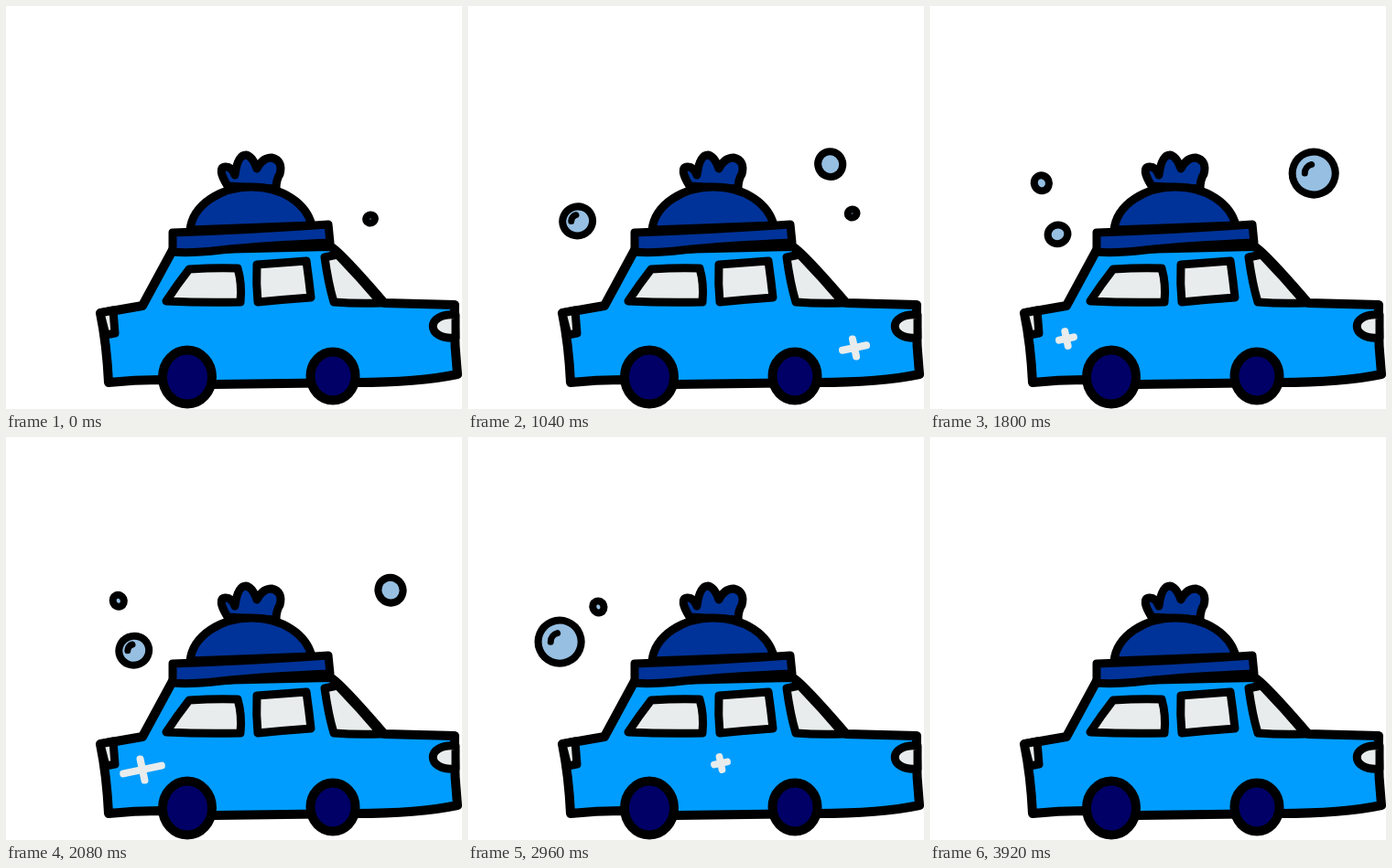
Write an HTML page with a canvas that moves like this. It is 498x441 px and loops after 4 s.

```html
<!DOCTYPE html>
<html lang="en">
<head>
<meta charset="utf-8">
<title>Clean car</title>
<style>
html, body { margin: 0; width: 100%; height: 100%; overflow: hidden; background: #fff; }
canvas { display: block; width: 498px; height: 441px; }
</style>
</head>
<body>
<canvas id="stage" width="498" height="441"></canvas>
<script>
const ctx = document.getElementById('stage').getContext('2d');
const LOOP = 4000, STEP = 40;
const BODY = '#009dff', HAT = '#003399', WHEEL = '#000066', GLASS = '#e8ecec', BUBBLE = '#96bfe2';

ctx.lineJoin = ctx.lineCap = 'round';

function paint(path, fill, width) {
  ctx.fillStyle = fill;
  ctx.fill(path);
  ctx.strokeStyle = '#000';
  ctx.lineWidth = width;
  ctx.stroke(path);
}

function shape(d, fill, width = 9) {
  paint(new Path2D(d), fill, width);
}

function oval(x, y, rx, ry, fill, width, tilt = 0) {
  const path = new Path2D();
  path.ellipse(x, y, rx, ry, tilt, 0, Math.PI * 2);
  paint(path, fill, width);
}

function drawCar() {
  shape('M103 336L149 328Q164 300 182 267L354 263Q364 268 413 325L490 327' +
    'Q489 365 493 403Q450 412 382 412L229 414L168 409Q140 409 112 412Q110 370 103 336Z', BODY, 10);
  shape('M200 288Q230 286 253 287Q258 304 256 324Q215 325 175 323Q186 306 200 288Z', GLASS);
  shape('M274 283Q300 281 328 279Q331 300 333 319Q305 321 275 324Q273 304 274 283Z', GLASS);
  shape('M348 275L362 272Q386 297 410 325Q382 326 358 324Q352 304 348 275Z', GLASS);
  shape('M491 338C458 335 458 366 491 363Z', GLASS);
  shape('M103 336L117 333L119 358L109 360Z', GLASS);
  oval(198, 406, 27, 29.5, WHEEL, 10);
  oval(357, 405, 24.5, 26.5, WHEEL, 10);

  shape('M242 197Q230 177 239 176Q246 175 250 185Q253 163 262 163Q269 164 274 178' +
    'Q280 166 290 166Q303 169 299 184Q295 190 295 200Z', HAT);
  shape('M201 245C204 217 235 198 268 198C302 198 328 216 334 240Z', HAT);
  shape('M182 248Q270 245 352 239L354 259Q280 262 235 267Q200 271 182 269Z', HAT);
}

const bubbles = [
  { start: 0, x: 398, y: 233 },
  { start: 400, x: 123, y: 273 },
  { start: 940, x: 422, y: 233 },
  { start: 1410, x: 143, y: 273 },
  { start: 2120, x: 103, y: 273 }
];
const POSE = 250, RADII = [5, 11, 16.5, 23.5, 13.5, 8, 6];
const BUBBLE_LIFE = POSE * RADII.length;

// Rises smoothly while the drawing swaps from pose to pose.
function drawBubble(age, x, y) {
  if (age < 0 || age >= BUBBLE_LIFE) return;
  const pose = Math.floor(age / POSE), r = RADII[pose];
  const cx = x - 3.5 * Math.sin(Math.PI * Math.sqrt(age / BUBBLE_LIFE));
  const cy = y - 0.0605 * age + 2.8e-6 * age * age;
  oval(cx, cy, r, r * (1 + 0.035 * (pose - 3)), BUBBLE, 8, -0.4);
  if (r > 15) {
    ctx.beginPath();
    ctx.arc(cx, cy, r * 0.42, Math.PI, Math.PI * 1.42);
    ctx.lineWidth = 7;
    ctx.stroke();
  }
}

const sparkles = [
  { start: 100, x: 307, y: 353 },
  { start: 520, x: 422, y: 374 },
  { start: 1700, x: 149, y: 364 },
  { start: 2350, x: 276, y: 357 }
];
const SPARKLE_LIFE = 750;

// A cross that stretches sideways as it grows.
function drawSparkle(age, x, y) {
  if (age < 0 || age >= SPARKLE_LIFE) return;
  const swell = Math.sin(Math.PI * (age / SPARKLE_LIFE) ** 0.85) ** 2;
  const w = 13 + 39 * swell, h = Math.min(w, 18.5 + w * 0.26);
  const width = Math.min(8, 5 + w * 0.12);
  const ax = (w - width) / 2, ay = (h - width) / 2;
  ctx.save();
  ctx.translate(x, y);
  ctx.rotate(-0.21);
  ctx.beginPath();
  ctx.moveTo(-ax, 0);
  ctx.lineTo(ax, 0);
  ctx.moveTo(0, -ay);
  ctx.lineTo(0, ay);
  ctx.strokeStyle = GLASS;
  ctx.lineWidth = width;
  ctx.stroke();
  ctx.restore();
}

function draw(t) {
  ctx.fillStyle = '#fff';
  ctx.fillRect(0, 0, 498, 441);
  drawCar();
  for (const { start, x, y } of sparkles) drawSparkle(t - start, x, y);
  for (const { start, x, y } of bubbles) drawBubble(t - start, x, y);
}

const began = performance.now();
function tick() {
  const t = (performance.now() - began) % LOOP;
  draw(Math.floor(t / STEP) * STEP);
  requestAnimationFrame(tick);
}
tick();
</script>
</body>
</html>
```
